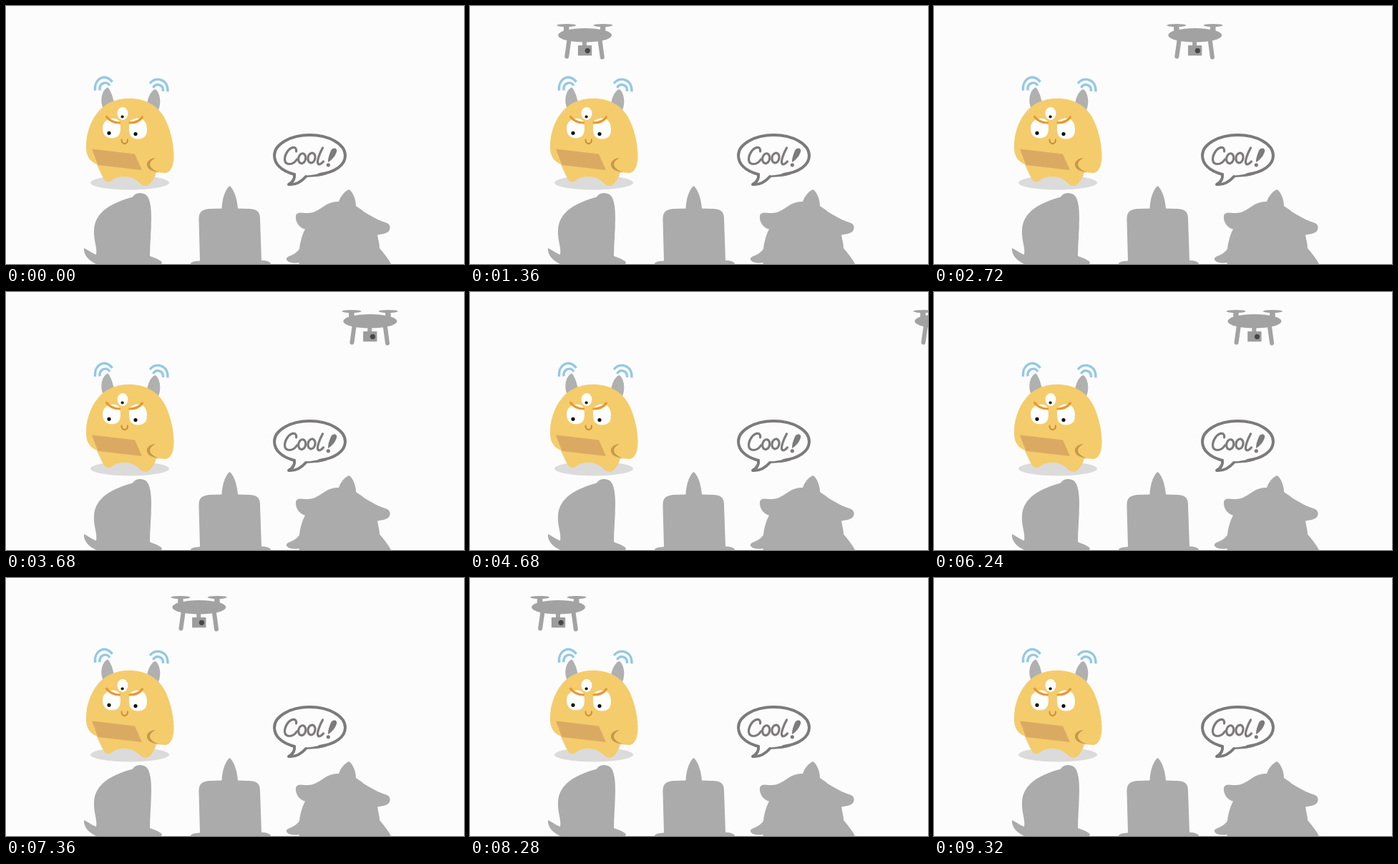
An HTML page for the animation above (9.6 s loop, 640 px wide and 360 px high).

```html
<!DOCTYPE html>
<html lang="en">
<head>
<meta charset="utf-8">
<title>Monster flying a drone</title>
<style>
  html, body { margin: 0; width: 100%; height: 100%; overflow: hidden; background: #fcfcfc; }
  svg { display: block; width: 100vw; height: 100vh; }
  .line { fill: none; stroke-linecap: round; stroke-linejoin: round; }
  .signal { stroke: #94c9e3; stroke-width: 3.4; stroke-linecap: butt; }
  .brow { stroke: #e9982f; stroke-width: 3.2; }
  .bubble { stroke: #7d7a7a; stroke-width: 4; }
  .letters { stroke: #7d7a7a; stroke-width: 3.2; }
</style>
</head>
<body>
<svg viewBox="0 0 640 360">
  <g id="drone" fill="#a2a2a2">
    <path class="line" stroke="#a2a2a2" stroke-width="6" d="M17 48 L13.8 70.5 M60.2 48 L63.4 71.5"/>
    <path d="M9.5 27 h7.5 v10 h-7.5 Z M60.5 27 h7.5 v10 h-7.5 Z M35.6 48 h6 v8 h-6 Z"/>
    <ellipse cx="13.3" cy="27" rx="13.4" ry="2"/>
    <ellipse cx="64.6" cy="27" rx="13.4" ry="2"/>
    <ellipse cx="39.2" cy="40.8" rx="37.5" ry="9.8"/>
    <rect x="29.5" y="55" width="19.3" height="14.2" fill="#9c9c9c"/>
    <circle cx="42.8" cy="62.3" r="3.6" fill="#474747"/>
  </g>

  <g id="monster">
    <ellipse cx="173" cy="246.5" rx="55" ry="10" fill="#dbdbdb"/>
    <g fill="#b0b0b0">
      <path d="M142 113.5 C146 117 150 127 151 138 L136 143 C131 134 133 118 142 113.5 Z"/>
      <path d="M208.5 116 C214 119 218 133 213 145 L197 137 C198 127 203 118 208.5 116 Z"/>
    </g>
    <path fill="#f4cc6c" d="M172 129 C195 129 212 139 221.5 156 C229 170 234 190 234.5 207
      C235 223 230 233 222 233 C218 233 214 232 210 232 C208 240 202 250 195.5 251
      C189 251 186 245 180 241.5 C170 236.5 158 237 150 242 C146 246 140 246.5 137 242
      C133 235 130 228 127 221 C118 217 112 210 112 198 C111.5 180 117 163 127 150
      C137 136 153 129 172 129 Z"/>
    <path fill="#dbaa62" d="M120 199.5 L180 206.5 L190 229 L128.5 222 Z"/>
    <path fill="#c8994a" d="M209 212 C193 213 191 230 214 232 C199 227 197 218 209 212 Z"/>
    <g fill="#fff">
      <path d="M136 165 C140 156 154 154 158.5 161 C160.5 168 161 178 156 182
        C150 186 140 185 136.5 178 C134.8 174 134.5 169 136 165 Z"/>
      <path d="M173 162 C178 155 189 156 193 160 C198 166 198 176 195 181
        C190 187 179 187 174 181 C171.5 176 171.5 168 173 162 Z"/>
      <ellipse cx="163" cy="150" rx="7.5" ry="9"/>
    </g>
    <g fill="#111">
      <circle cx="144" cy="177.3" r="2.6"/>
      <circle cx="181" cy="178.6" r="2.6"/>
      <circle cx="162.6" cy="154.5" r="2.1"/>
    </g>
    <path class="line brow" d="M140.5 154.5 Q147 163 158.5 163 M173 163 Q185 163 190.5 155"/>
    <path class="line" stroke="#c98f35" stroke-width="2" d="M161.5 186.5 C161 194 170.5 194 170 186.5"/>
    <path class="line signal" d="M124.5 118 C123 100 140 93.5 148.5 106 M131 117.5 C130 107 141 104 145 111
      M201 108 C208 98 227 101 226 119.5 M205.5 114 C210 107 220 109 219.5 119"/>
  </g>

  <g id="speech" role="img" aria-label="Cool!">
    <path class="line bubble" d="M403 235 C384 230 375 220 375 208.5 C375 193 397 180 424.5 180
      C452 180 474 193 474 208.5 C474 222 460 232 438 235"/>
    <path fill="#7d7a7a" d="M444 232 C436 234.5 428 236 419 236.5 L419 239 C430 238.5 440 238 448 235 Z"/>
    <path class="line bubble" d="M403 235 C404 241 400 246 395 249 C406 250 413 245 419 238"/>
    <g class="line letters">
      <path d="M405.5 203 C406.5 196 400 195.5 394 202 C387.5 211 388 220.5 396 220.5 C400 220.5 404 218 406.5 214"/>
      <ellipse cx="413.7" cy="212.7" rx="5" ry="7" transform="rotate(12 413.7 212.7)"/>
      <ellipse cx="427" cy="212" rx="5" ry="7" transform="rotate(12 427 212)"/>
      <path d="M442.5 198 C438 206 434 217 436 220 C438 222 441 220 443.5 217"/>
    </g>
    <g fill="#7d7a7a">
      <path d="M453.5 203 C455.5 197 463.5 197 462 203.5 C460 210 455 215 450.3 218 C449.5 214 451.5 208 453.5 203 Z"/>
      <circle cx="450.3" cy="221.8" r="2.6"/>
    </g>
  </g>

  <g id="crowd" fill="#ababab">
    <path d="M109 338 C113 339 118 344 126 347 C128 338 122 326 123 313 C124 286 150 274 177 266.5
      C180 261 188 259 195 263 C201 267 203 280 203 295 C203 315 201 333 201 349
      C207 351 216 354 218 358 L217 360 H126 C117 356 108 348 109 338 Z"/>
    <path d="M312.5 251 C319 256 323 270 324 282.5 L341 283 C352 284 355 288 355 297 L357 355
      C364 355 370 357 370 360 H258 C258 357 264 356 271 355.5 L269.5 299
      C269 287 274 284 284 283 L301.5 282.5 C302 270 306 256 312.5 251 Z"/>
    <path d="M479.5 256 C485 260 489 270 489 279 C492 281 497 284 500 287 C510 293 520 299 530 302
      C537 304 538 309 535 314 C532 318 525 318 519 319.5 C520 326 522 332 522 338
      C528 345 534 352 538 360 H410 L409 358 C404 359 395 359 392 354 C391 348 402 350 410 339
      C411 329 414 319 418 311.5 C410 310 404 301 405 293 C406 288 411 288 418 289
      C430 290 437 284 445 279 C452 274 459 273 465 273 C467 267 472 259 479.5 256 Z"/>
  </g>
</svg>
<script>
  const LOOP = 9600, STEP = 40;
  // [time in ms, left edge of the drone]
  const flight = [[0, -82.7], [4800, 637.7], [9320, -81], [LOOP, -81]];
  const drone = document.getElementById('drone');

  function droneX(t) {
    const i = flight.findIndex(([end]) => t < end);
    const [t0, x0] = flight[i - 1], [t1, x1] = flight[i];
    return x0 + (x1 - x0) * (t - t0) / (t1 - t0);
  }

  const start = performance.now();
  function draw() {
    const t = (performance.now() - start) % LOOP;
    const x = droneX(Math.floor(t / STEP) * STEP);
    drone.setAttribute('transform', `translate(${x.toFixed(2)} 0)`);
    requestAnimationFrame(draw);
  }
  draw();
</script>
</body>
</html>
```
